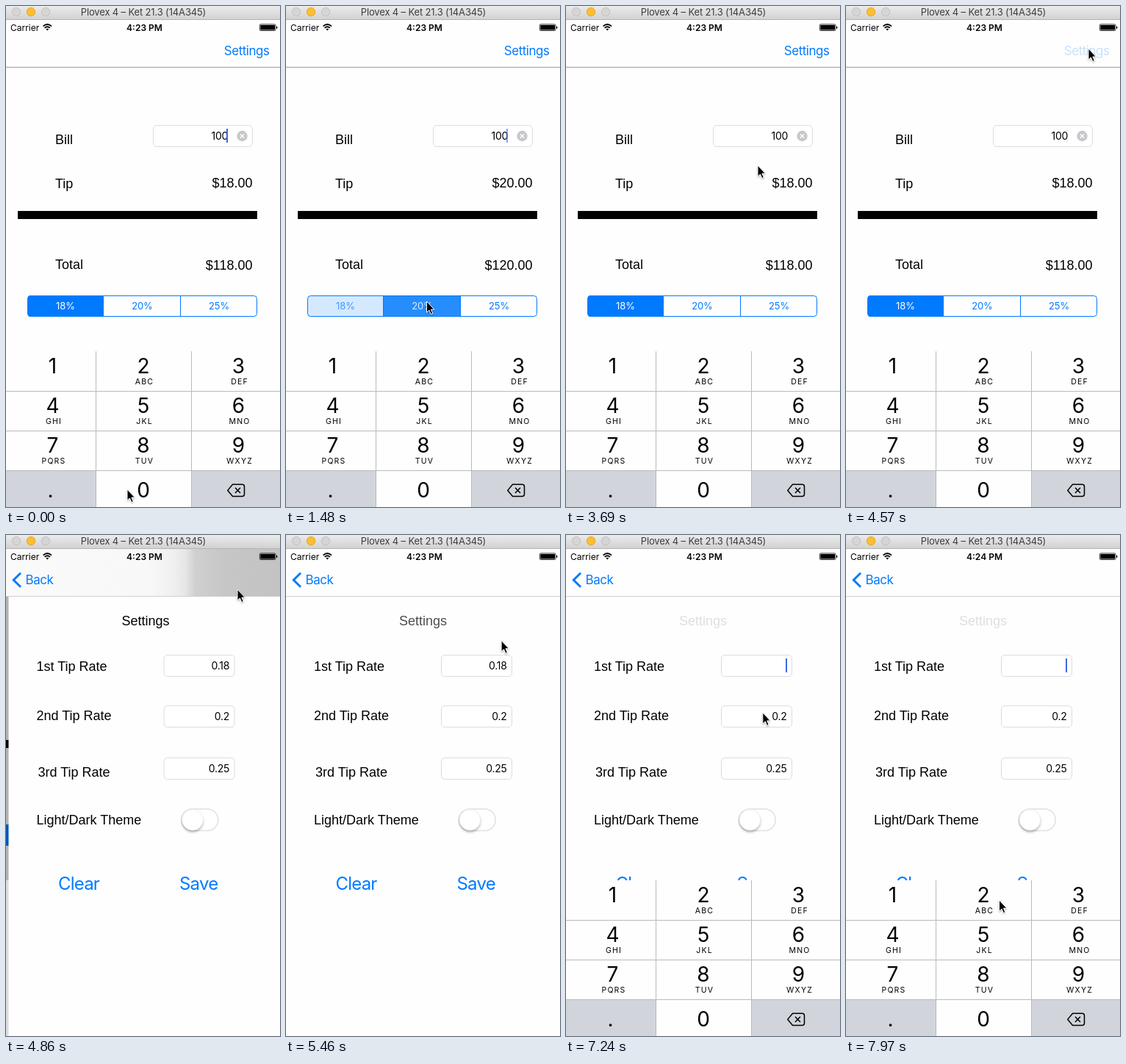
These frames come from a looping animation (373x682 px, 8 s). An HTML page:

```html
<!DOCTYPE html>
<html lang="en">
<head>
<meta charset="utf-8">
<title>Tip calculator</title>
<style>
  html, body { margin: 0; width: 100%; height: 100%; overflow: hidden; background: #fefefe; }
  svg { display: block; width: 373px; height: 682px; }
  text { font-family: Inter, Roboto, sans-serif; white-space: pre; }
  .label text, text.label { font: 18px "Liberation Sans", Arial, sans-serif; }
  .end { text-anchor: end; }
  .mid { text-anchor: middle; }
  .nav { font-size: 17px; letter-spacing: -.48px; fill: #007aff; }
  .input { font-size: 14px; letter-spacing: -.3px; text-anchor: end; }
  .box { fill: #fff; stroke: #dcdcdc; }
  .button { font-size: 24px; letter-spacing: -.8px; fill: #007aff; }
  .seg { font-size: 13px; letter-spacing: -.1px; text-anchor: middle; fill: #007aff; }
  .digit { font-size: 28px; text-anchor: middle; }
  .letters { font-size: 10.5px; letter-spacing: 1.2px; text-anchor: middle; }
  .caret { fill: #4069e0; }
</style>
</head>
<body>
<svg viewBox="0 0 373 682">
  <defs>
    <linearGradient id="chrome" x2="0" y2="1">
      <stop stop-color="#ebebeb"/><stop offset="1" stop-color="#d2d2d2"/>
    </linearGradient>
    <linearGradient id="shade">
      <stop stop-color="#fafafa"/><stop offset=".52" stop-color="#f8f8f8"/>
      <stop offset=".61" stop-color="#f0f0f0"/><stop offset=".655" stop-color="#e6e6e6"/>
      <stop offset=".69" stop-color="#d0d0d0"/><stop offset=".8" stop-color="#c6c6c6"/>
      <stop offset="1" stop-color="#c3c3c3"/>
    </linearGradient>
    <filter id="soft" x="-30%" y="-30%" width="160%" height="170%">
      <feDropShadow dx="0" dy="2.5" stdDeviation="1.6" flood-opacity=".28"/>
    </filter>
    <filter id="lift" x="-50%" y="-30%" width="220%" height="180%">
      <feDropShadow dx="0" dy="1" stdDeviation=".8" flood-opacity=".35"/>
    </filter>
  </defs>
  <rect width="373" height="682" fill="#fefefe"/>

  <g id="home">
    <g class="label">
      <text x="67" y="187.5">Bill</text>
      <text x="67" y="247.5">Tip</text>
      <text x="67" y="357.5">Total</text>
      <text id="tip" class="end" x="335.5" y="247"></text>
      <text id="total" class="end" x="335.5" y="359"></text>
    </g>
    <rect class="box" x="200.5" y="162.5" width="135" height="29" rx="5"/>
    <text class="input" x="302" y="182">100</text>
    <circle cx="321.5" cy="177" r="7.2" fill="#c7c7cc"/>
    <path d="M318.7 174.2l5.6 5.6m0-5.6l-5.6 5.6" stroke="#fff" stroke-width="1.4"/>
    <rect id="billCaret" class="caret" x="300" y="167" width="2" height="19"/>
    <path d="M16 279H342V290H16Z"/>
    <g id="segments"></g>
    <rect x="29.5" y="394.5" width="312" height="28" rx="4" fill="none" stroke="#007aff"/>
    <path d="M132.5 395V422M237.5 395V422" stroke="#007aff"/>
  </g>

  <g id="strip">
    <path d="M0 84H6V470H0Z" fill="#000" opacity=".3"/>
    <path d="M0 470H6V682H0Z" fill="#dcdcdc"/>
  </g>

  <g id="settings">
    <rect y="84" width="373" height="598" fill="#fefefe"/>
    <text id="heading" class="label" x="154" y="122.5">Settings</text>
    <g class="label">
      <text x="38" y="184.5">1st Tip Rate</text>
      <text x="38" y="251.5">2nd Tip Rate</text>
      <text x="40" y="328.5">3rd Tip Rate</text>
      <text x="38" y="393.5">Light/Dark Theme</text>
    </g>
    <rect class="box" x="211.5" y="163.5" width="96" height="29" rx="4.5"/>
    <rect class="box" x="211.5" y="232.5" width="96" height="29" rx="4.5"/>
    <rect class="box" x="211.5" y="303.5" width="96" height="29" rx="4.5"/>
    <text id="rate" class="input" x="300.5" y="183">0.18</text>
    <text class="input" x="300.5" y="252">0.2</text>
    <text class="input" x="300.5" y="323">0.25</text>
    <rect id="rateCaret" class="caret" x="299" y="168" width="2" height="19"/>
    <rect x="235.2" y="373" width="50" height="29.5" rx="14.7" fill="#fff" stroke="#e0e0e0" stroke-width="1.5"/>
    <circle cx="250.5" cy="387.8" r="14.2" fill="#fff" stroke="#ddd" stroke-width=".5" filter="url(#soft)"/>
    <text class="button" x="67.5" y="483">Clear</text>
    <text class="button" x="232.5" y="483">Save</text>
  </g>

  <g id="keypad">
    <rect y="470" width="373" height="212" fill="#fefefe"/>
    <path d="M0 632H122V682H0ZM253 632H373V682H253Z" fill="#d1d4db"/>
    <path d="M0 524.5H373M0 578.5H373M0 632.5H373M122.5 470V682M252.5 470V682" stroke="#b9babd"/>
    <path d="M308.5 651.2H321.5Q324.5 651.2 324.5 654.2V664.5Q324.5 667.5 321.5 667.5H308.5L301.8 659.4Z
             M312 655.8l7 7.2m0-7.2l-7 7.2" fill="none" stroke="#000" stroke-width="1.5" stroke-linejoin="round"/>
  </g>

  <rect id="navShade" y="19" width="373" height="64" fill="url(#shade)"/>
  <path id="navLine" d="M0 83.5H373"/>
  <text id="settingsLink" class="nav end" x="358.5" y="67">Settings</text>
  <g id="back">
    <path d="M20 51.8L10.3 61.3L20 70.8" fill="none" stroke="#007aff" stroke-width="3"/>
    <text class="nav" x="26.5" y="67">Back</text>
  </g>

  <text x="6" y="33.5" font-size="12">Carrier</text>
  <g fill="none" stroke="#000" stroke-width="1.7">
    <path d="M50.6 27.6Q56.3 22.4 62 27.6M52.7 29.9Q56.3 26.6 59.9 29.9"/>
    <path d="M56.3 33.6L54.4 31.6Q56.3 30.1 58.2 31.6Z" fill="#000" stroke="none"/>
  </g>
  <text id="clock" class="mid" x="188.5" y="33.5" font-size="12" font-weight="600"></text>
  <rect x="345.4" y="24.9" width="21.6" height="8.6" rx="1.4" fill="none" stroke="#000" stroke-width=".8"/>
  <path d="M346.4 25.9H366V32.5H346.4ZM368 27.5Q369.5 27.7 369.5 29.2T368 31Z"/>

  <rect width="373" height="18" fill="url(#chrome)"/>
  <path d="M0 18.5H373" stroke="#b4b4b4"/>
  <g fill="#d5d5d5" stroke="#c2c2c2">
    <circle cx="14" cy="8" r="5.7"/>
    <circle cx="34" cy="8" r="5.7" fill="#fdbe2f" stroke="#e3a52a"/>
    <circle cx="54" cy="8" r="5.7"/>
  </g>
  <text class="mid" x="187" y="13" font-size="13" letter-spacing="-.15" fill="#3d3d3d">Plovex 4 – Ket 21.3 (14A345)</text>

  <path id="cursor" d="M0 0V15.2L3.4 12L5.9 17.6L8.3 16.6L5.9 11.1H10.4Z" stroke="#fff" stroke-width="1" filter="url(#lift)"/>
</svg>
<script>
const LOOP = 8000;
const $ = id => document.getElementById(id);

function add(parent, tag, attrs, content = '') {
  const el = document.createElementNS('http://www.w3.org/2000/svg', tag);
  for (const key in attrs) el.setAttribute(key, attrs[key]);
  el.textContent = content;
  return parent.appendChild(el);
}

// Keypad
const columns = [63.5, 187, 316.5];
['', 'ABC', 'DEF', 'GHI', 'JKL', 'MNO', 'PQRS', 'TUV', 'WXYZ'].forEach((letters, i) => {
  const x = columns[i % 3], y = 500 + 54 * Math.floor(i / 3);
  add($('keypad'), 'text', { class: 'digit', x, y }, i + 1);
  add($('keypad'), 'text', { class: 'letters', x: x + 1.5, y: y + 15 }, letters);
});
add($('keypad'), 'text', { class: 'digit', x: 60.5, y: 669 }, '.');
add($('keypad'), 'text', { class: 'digit', x: 187, y: 669 }, '0');

// Segmented control; each track holds [time, selectedness]
const segments = [
  { rate: 18, x: 81, d: 'M133 394H33.5Q29.5 394 29.5 398V419Q29.5 423 33.5 423H133Z',
    track: [[1470, 1], [1480, .16], [1630, 0], [3230, 0], [3240, .84], [3380, 1]] },
  { rate: 20, x: 185.5, d: 'M132 394H238V423H132Z',
    track: [[1470, 0], [1480, .85], [1620, 1], [2190, 1], [2200, .16], [2350, 0]] },
  { rate: 25, x: 290, d: 'M237 394H337.5Q341.5 394 341.5 398V419Q341.5 423 337.5 423H237Z',
    track: [[2190, 0], [2200, .84], [2350, 1], [3230, 1], [3240, .16], [3380, 0]] }
];
for (const s of segments) {
  const place = { class: 'seg', x: s.x, y: 413.3 }, label = s.rate + '%';
  s.fill = add($('segments'), 'path', { d: s.d, fill: '#007aff' });
  s.off = add($('segments'), 'text', place, label);
  s.on = add($('segments'), 'text', { ...place, style: 'fill:#fff' }, label);
}

// Screen refresh moments: [first, last, count]
const steps = [0];
for (const [a, b, n] of [[140, 1180, 8], [1480, 2500, 8], [2650, 3690, 8], [3830, 4570, 6],
                         [4860, 5900, 8], [6050, 6200, 2], [6500, 6500, 1], [6940, 7970, 8]])
  for (let i = 0; i < n; i++)
    steps.push(Math.floor((a + (n > 1 ? (b - a) * i / (n - 1) : 0)) / 10) * 10);

const path = [
  [0, 165, 658], [140, 165, 655], [1030, 190, 405], [1180, 191.5, 402], [1480, 191.5, 402],
  [2060, 293, 416], [2500, 293, 416], [2940, 131, 390], [3090, 82, 402], [3240, 82, 402],
  [3690, 261, 217], [4270, 328, 62], [4420, 330, 58], [4570, 330, 58], [4860, 315, 74],
  [5750, 282, 179], [5900, 282, 180], [7080, 282, 180], [7820, 212, 485], [7970, 208.5, 497]
];

function sample(keys, t, k = 1) {
  const i = keys.findIndex(key => key[0] > t);
  if (i < 0) return keys[keys.length - 1][k];
  if (i === 0) return keys[0][k];
  const a = keys[i - 1], b = keys[i];
  return a[k] + (b[k] - a[k]) * (t - a[0]) / (b[0] - a[0]);
}

const ease = p => p * p * (3 - 2 * p);
const clamp = v => Math.min(1, Math.max(0, v));
const fade = (el, v) => el.setAttribute('opacity', v);
const show = (el, on) => { el.style.display = on ? '' : 'none'; };
const move = (el, x, y) => el.setAttribute('transform', `translate(${x} ${y})`);
const blink = [[0, 1], [400, 1], [590, 0], [750, 0], [900, 1]];

function draw(t) {
  const pushed = t >= 4860, sliding = pushed && t < 5000, editing = t >= 6940;
  const rate = t < 1480 || t >= 3240 ? 18 : t < 2200 ? 20 : 25;
  $('tip').textContent = `$${rate}.00`;
  $('total').textContent = `$${100 + rate}.00`;
  for (const s of segments) {
    const w = sample(s.track, t);
    fade(s.fill, w);
    fade(s.on, w);
    fade(s.off, 1 - w);
  }

  const caret = sample(blink, t % 1000);
  fade($('billCaret'), caret);
  fade($('rateCaret'), editing ? caret : 0);
  show($('rate'), !editing);

  show($('home'), !pushed || sliding);
  move($('home'), sliding ? -110 : 0, 0);
  show($('strip'), sliding);
  show($('navShade'), sliding);
  show($('settings'), pushed);
  move($('settings'), sliding ? 3.5 : 0, 0);
  fade($('heading'), 1 - .88 * ease(clamp((t - 4860) / 1500)));

  show($('back'), pushed);
  show($('settingsLink'), !pushed);
  fade($('settingsLink'), t >= 4570 ? .22 : 1);
  $('navLine').setAttribute('stroke', pushed ? '#cfcfcf' : '#b2b2b2');
  $('navLine').setAttribute('stroke-width', pushed ? 1 : 1.4);

  show($('keypad'), !pushed || editing);
  move($('keypad'), 0, editing ? 212 * (1 - clamp((t - 6840) / 390)) ** 2 : 0);
  $('clock').textContent = t < 7370 ? '4:23 PM' : '4:24 PM';
  move($('cursor'), sample(path, t), sample(path, t, 2));
}

function tick() {
  const now = performance.now() % LOOP;
  draw(steps.filter(s => s <= now).pop());
  requestAnimationFrame(tick);
}
tick();
</script>
</body>
</html>
```
